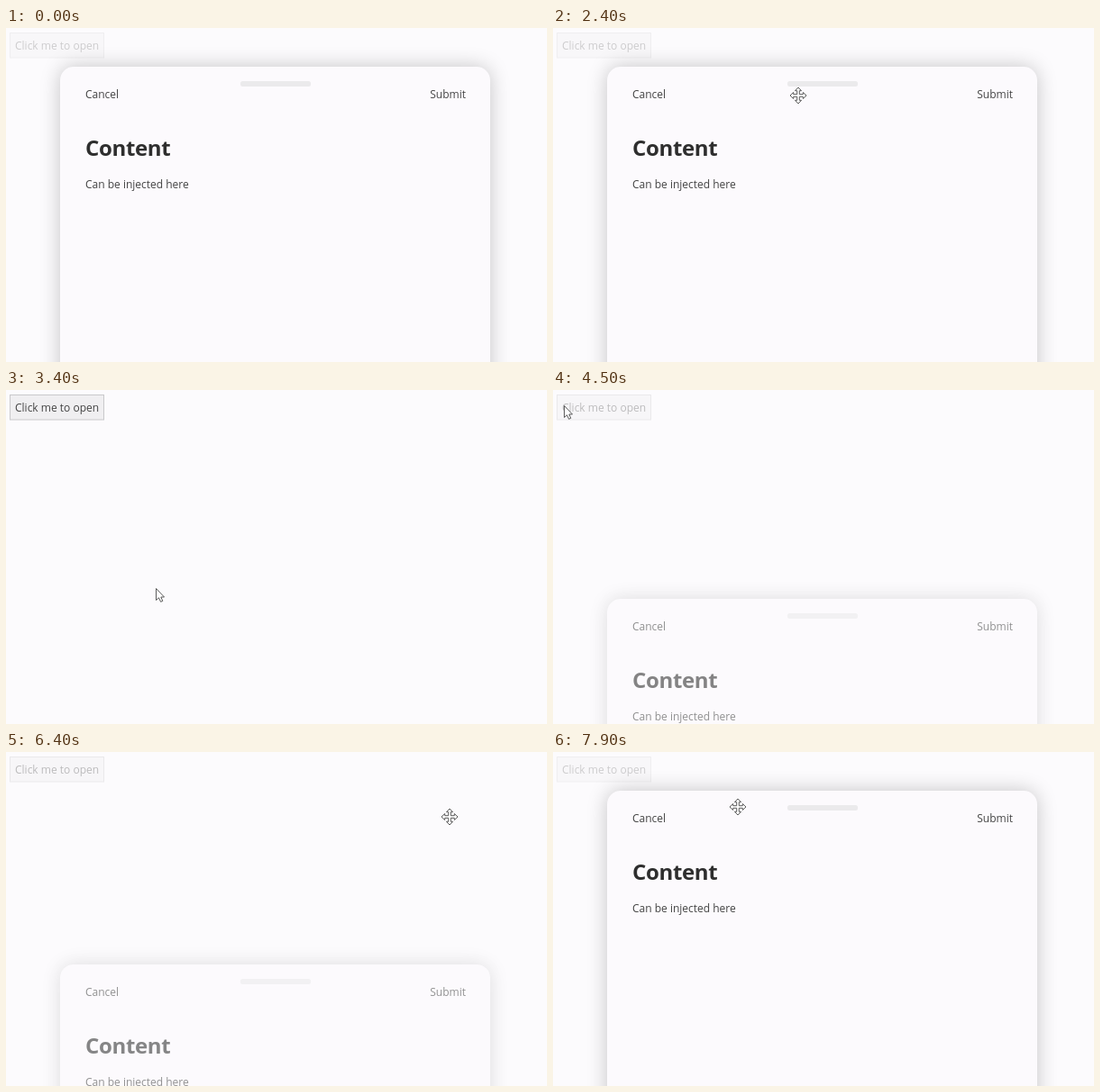
Recreate the animation shown at these times as an HTML page. Size 600 by 371 pixels, loop 8 s.

```html
<!DOCTYPE html>
<html lang="en">
<head>
<meta charset="utf-8">
<title>Bottom sheet</title>
<style>
  html, body { margin: 0; width: 100%; height: 100%; overflow: hidden; background: #fcfbfd; }
  #stage { position: relative; width: 600px; height: 371px; overflow: hidden; }
  #sheet { position: absolute; left: 60px; top: 43px; width: 477px; height: 420px;
    border-radius: 15px; background: #fcfafd; box-shadow: 0 0 22px rgba(0, 0, 0, .22); }
  svg { position: absolute; left: 0; top: 0; width: 100%; height: 100%; overflow: visible; }
  text { font: 12px "Open Sans", "Noto Sans", sans-serif; fill: #444; }
  .title { font-size: 24px; font-weight: 700; letter-spacing: -.35px; fill: #2e2e2e; }
  .pointer { fill: #fff; stroke: #4a4a4a; stroke-width: .9; stroke-linejoin: round; }
</style>
</head>
<body>
<div id="stage">
  <svg>
    <g id="button">
      <rect x="4.5" y="5.5" width="104" height="27.5" fill="#f0eff1" stroke="#c9c9cb"/>
      <text x="10" y="24">Click me to open</text>
    </g>
  </svg>
  <div id="sheet">
    <svg>
      <rect x="200" y="16" width="78" height="6" rx="2.5" fill="#ebeaec"/>
      <text x="28" y="35">Cancel</text>
      <text x="450" y="35" text-anchor="end">Submit</text>
      <text class="title" x="28" y="99">Content</text>
      <text x="28" y="135">Can be injected here</text>
    </svg>
  </div>
  <svg>
    <path id="arrow" class="pointer" d="M.5 .5V13.5L3.5 10.8 5.6 15.3 7.8 14.3 5.8 10H9.5Z"/>
    <path id="move" class="pointer" d="M0-9 3.5-5.3H1.3V-1.3H5.3V-3.5L9 0 5.3 3.5V1.3H1.3V5.3H3.5L0 9-3.5 5.3H-1.3V1.3H-5.3V3.5L-9 0-5.3-3.5V-1.3H-1.3V-5.3H-3.5Z"/>
  </svg>
</div>
<script>
const LOOP = 8000, TRAVEL = 382, SHEET_TOP = 43, HEADER = 60;
const [button, sheet, arrow, move] =
  ["button", "sheet", "arrow", "move"].map(id => document.getElementById(id));

// pointer targets: start time, x, y; the duration follows from the distance
const ENTER = { t: 1650, x: 140, y: 140 };
const targets = [
  [1700, 340, 55], [2120, 272, 75], [2600, 166, 220], [3450, 12, 17],
  [4650, 75, 41], [5000, 129, 96], [5280, 492, 72],
  [6550, 150, 90], [7100, 26, 21], [7510, 205, 61]
];

function ramp(t, start, length) {
  const u = Math.min(1, Math.max(0, (t - start) / length));
  return u * u * (3 - 2 * u);
}

// 0 is open, 1 is closed: dragged down, opened, submitted, opened
const closed = t => ramp(t, 2550, 500) - ramp(t, 4350, 300)
                  + ramp(t, 6250, 300) - ramp(t, 7550, 300);

function pointerAt(t) {
  let { x, y, t: moved } = ENTER;
  for (const [start, toX, toY] of targets) {
    if (t < start) break;
    const length = 200 + Math.hypot(toX - x, toY - y);
    const k = ramp(t, start, length);
    x += (toX - x) * k;
    y += (toY - y) * k;
    moved = Math.min(t, start + length);
  }
  return { x, y, moved };
}

function draw(t) {
  const p = closed(t);
  sheet.style.transform = `translateY(${p * TRAVEL}px)`;
  sheet.style.opacity = 1 - .85 * p;
  button.style.opacity = .25 + .75 * p ** 3;

  // the pointer's shape is only updated while it moves
  const { x, y, moved } = pointerAt(t);
  const depth = y - SHEET_TOP - closed(moved) * TRAVEL;
  const onHeader = depth > 0 && depth < HEADER;
  for (const [el, on] of [[arrow, !onHeader], [move, onHeader]]) {
    el.setAttribute("transform", `translate(${x} ${y})`);
    el.style.display = t >= ENTER.t && on ? "" : "none";
  }
}

const start = performance.now();
function frame() {
  draw((performance.now() - start) % LOOP);
  requestAnimationFrame(frame);
}
frame();
</script>
</body>
</html>
```
